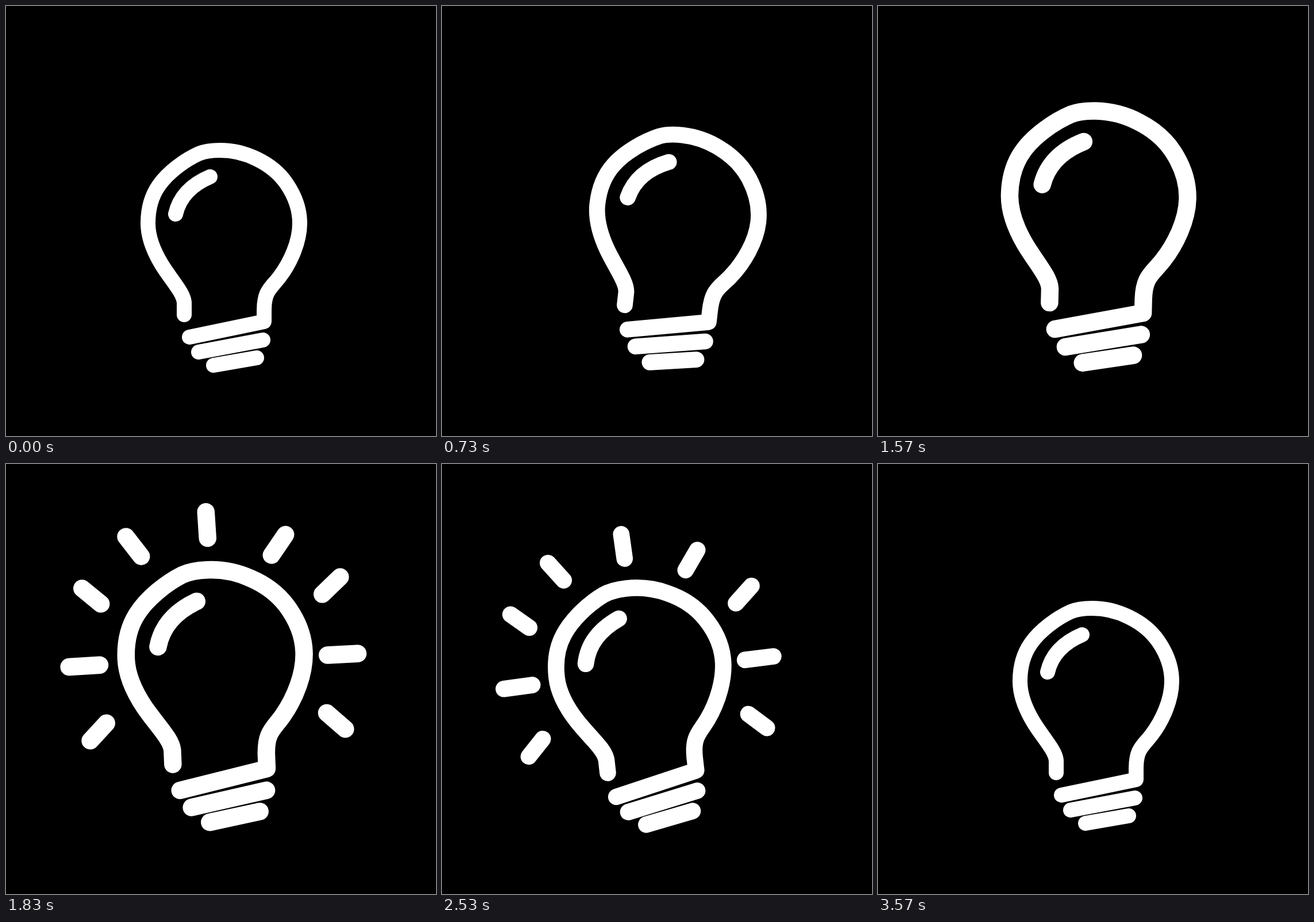
Write an HTML page that moves like this. It is 748 px wide and 748 px high and loops after 3910 ms.

```html
<!DOCTYPE html>
<html lang="en">
<head>
<meta charset="utf-8">
<title>Light bulb</title>
<style>
  html, body { margin: 0; width: 100%; height: 100%; overflow: hidden; background: #000; }
  svg { display: block; width: 100%; height: 100%; }
  path { fill: none; stroke: #fff; stroke-width: 26; stroke-linecap: round; stroke-linejoin: round; }
</style>
</head>
<body>
<svg viewBox="0 0 748 748">
  <g id="bulb">
    <path d="M310 537V516Q309.5 508 303 497C294 482 280 465 271 450C257 427 247 403 247 378
      C247 352 254 329 266 312C282 289 311 268 335 257C347 252 360 251 372 251
      C395 251 416 256 436 266C457 276 475 290 488 309C503 331 511 354 511 378
      C511 410 495 446 476 471C467 483 459 489 454 500Q449 511 449 530V549L319 576"/>
    <path d="M335 602L447 581M361 625L436 612"/>
    <path d="M295 362Q305 318 355 297"/>
    <path id="rays" d="M374 165L375 204M254 197L275.5 227M186 271L213 295M162 386.5L207.5 385.5
      M214 472L189 497M490.5 203.5L468.5 233M569 269.5L541.5 294M545.5 384.5L590.5 384M541 470L567.5 495"/>
  </g>
</svg>
<script>
const LOOP = 3910, FPS = 30;
const PIVOT = [394.5, 644.5];
// [frame, value]
const SWAY = [[1, 0], [27, 7.2], [72, -6.8], [107, 0]];
const SCALE = [[1, 1], [51, 1.176], [107, 1]];
const RAYS_ON = [[30, 41], [51, 81]];

const bulb = document.getElementById('bulb');
const rays = document.getElementById('rays');
const ease = u => u * u * (3 - 2 * u);

function valueAt(keys, frame) {
  const next = keys.findIndex(([f]) => f > frame);
  if (next === 0) return keys[0][1];
  if (next < 0) return keys[keys.length - 1][1];
  const [f0, v0] = keys[next - 1], [f1, v1] = keys[next];
  return v0 + (v1 - v0) * ease((frame - f0) / (f1 - f0));
}

function draw(now) {
  // Frames start on rounded 10 ms ticks, hence the small offset.
  const frame = Math.floor((now % LOOP + 4) * FPS / 1000);
  const [x, y] = PIVOT;
  bulb.setAttribute('transform',
    `translate(${x} ${y}) rotate(${valueAt(SWAY, frame)}) scale(${valueAt(SCALE, frame)}) translate(${-x} ${-y})`);
  const lit = RAYS_ON.some(([on, off]) => frame >= on && frame < off);
  rays.style.display = lit ? '' : 'none';
}

let start;
function tick(now) {
  start ??= now;
  draw(now - start);
  requestAnimationFrame(tick);
}
draw(0);
requestAnimationFrame(tick);
</script>
</body>
</html>
```
